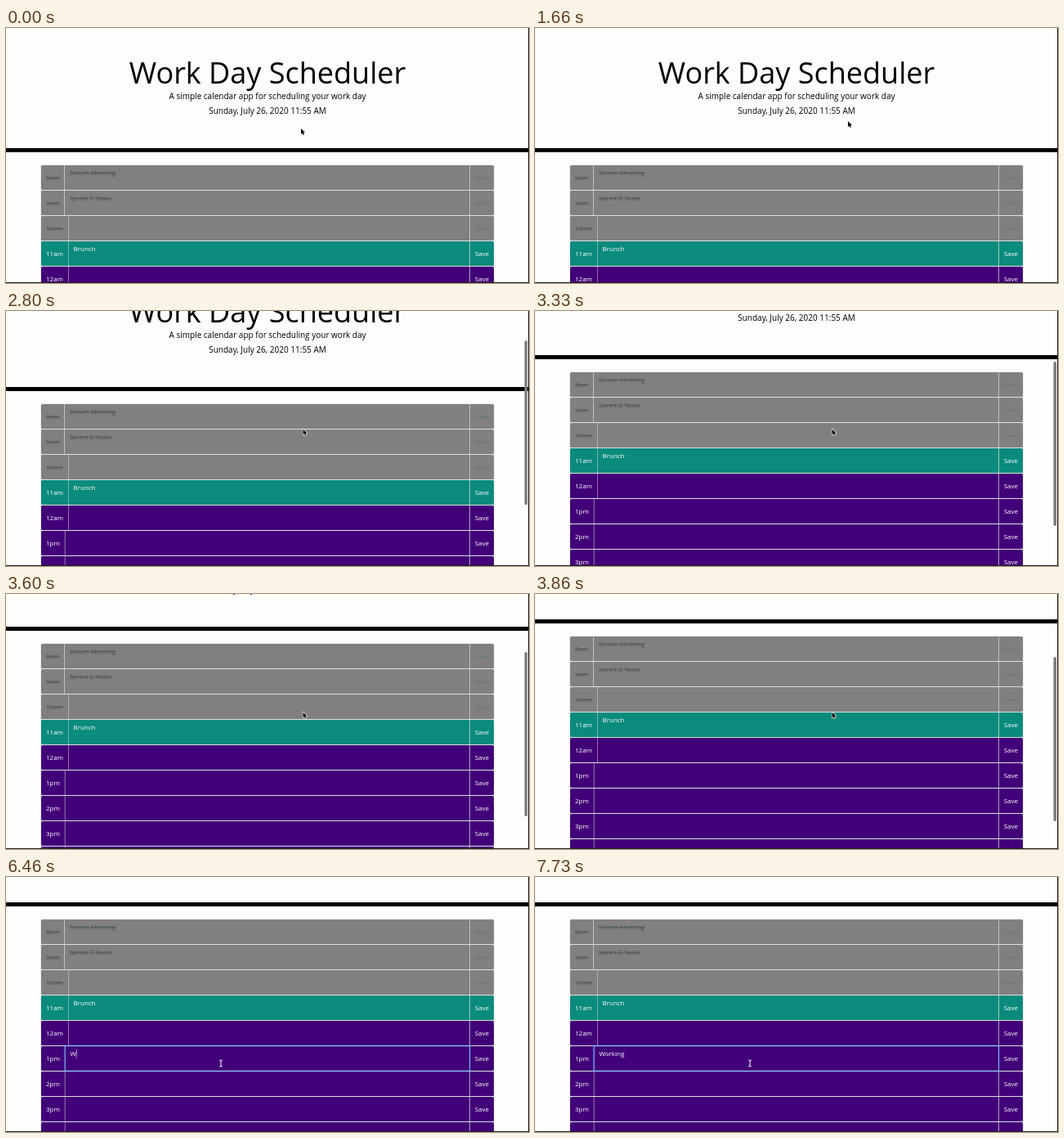
An HTML page with a canvas for the animation above (8000 ms loop, 640 px wide and 312 px high).

```html
<!DOCTYPE html>
<html lang="en">
<head>
<meta charset="utf-8">
<title>Work Day Scheduler</title>
<style>
html, body { margin: 0; width: 100%; height: 100%; overflow: hidden; background: #fdfdfc; }
canvas { display: block; width: 640px; height: 312px; }
</style>
</head>
<body>
<canvas id="stage"></canvas>
<script>
const W = 640, H = 312, LOOP = 8000;
const LEFT = 42.5, RIGHT = 597.5, TOP = 167.5, ROW = 31;
const FONT = '"Open Sans", "Noto Sans", sans-serif';
const PAST = '#808080', NOW = '#0a8b7c', NEXT = '#420078', LINE = '#d3d6da';

const canvas = document.getElementById('stage');
const ctx = canvas.getContext('2d');
const dpr = window.devicePixelRatio || 1;
canvas.width = W * dpr;
canvas.height = H * dpr;

const hours = ['8am', '9am', '10am', '11am', '12am', '1pm', '2pm', '3pm', '4pm', '5pm'];
const notes = { 0: 'Scrum Meeting', 1: 'Sprint 2 Tasks', 3: 'Brunch' };

// Each entry: time, then the values reached at that time.
const scrollPath = [[2000, 0], [2400, 22], [2800, 54], [3330, 93], [3660, 110], [3860, 116]];
const mousePath = [
  [0, 361, 123], [60, 361, 123], [260, 383, 92], [400, 387, 96], [600, 387, 96],
  [860, 381, 96], [1260, 381, 96], [1660, 383, 114], [1860, 375, 126], [2000, 363.5, 144.5],
  [4060, 363.5, 144.5], [4360, 310, 194], [4660, 302, 203], [5660, 302, 203],
  [6060, 266, 225], [6200, 263, 228]
];
const FOCUS_A = 4360, FOCUS_B = 6130, TYPE_START = 6460, KEY = 123, WORD = 'Working';

function sample(path, t) {
  if (t <= path[0][0]) return path[0].slice(1);
  for (let i = 1; i < path.length; i++) {
    const a = path[i - 1], b = path[i];
    if (t <= b[0]) {
      const k = (t - a[0]) / (b[0] - a[0]);
      return a.slice(1).map((v, j) => v + (b[j + 1] - v) * k);
    }
  }
  return path[path.length - 1].slice(1);
}

function text(str, x, y, size, color, align = 'left') {
  ctx.font = `${size}px ${FONT}`;
  ctx.textAlign = align;
  ctx.fillStyle = color;
  ctx.fillText(str, x, y);
}

function textWidth(str) {
  ctx.font = `8px ${FONT}`;
  return ctx.measureText(str).width;
}

function label(str, x, y, color, struck) {
  text(str, x, y, 8, color);
  if (struck) ctx.fillRect(x, y - 2.8, textWidth(str), 0.6);
}

function cell(x, y, w, color, radii, border = LINE) {
  ctx.fillStyle = border;
  ctx.beginPath();
  ctx.roundRect(x, y, w, ROW, radii);
  ctx.fill();
  ctx.fillStyle = color;
  ctx.beginPath();
  ctx.roundRect(x + 0.5, y + 0.5, w - 1, ROW - 1, radii.map(r => Math.max(0, r - 0.5)));
  ctx.fill();
}

function focusRing(x, y, w) {
  ctx.strokeStyle = 'rgba(0,123,255,0.25)';
  ctx.lineWidth = 1.6;
  ctx.strokeRect(x - 0.8, y - 0.8, w + 1.6, ROW + 1.6);
  ctx.strokeStyle = '#80bdff';
  ctx.lineWidth = 0.7;
  ctx.strokeRect(x + 0.3, y + 0.3, w - 0.6, ROW - 0.6);
}

function rowBox(i) {
  const saveW = textWidth('Save') + 13;
  const split = LEFT + textWidth(hours[i]) + 13;
  return { split, field: split - 0.5, fieldW: RIGHT - saveW - split + 1, save: RIGHT - saveW, saveW };
}

function drawRow(i, y, note) {
  const past = i < 3;
  const fill = past ? PAST : i === 3 ? NOW : NEXT;
  const ink = past ? '#465150' : '#fff';
  const box = rowBox(i);
  cell(LEFT, y, box.split - LEFT, fill, [2, 0, 0, 2]);
  cell(box.save, y, box.saveW, fill, [0, 2, 2, 0]);
  cell(box.field, y, box.fieldW, fill, [0, 0, 0, 0]);
  label(hours[i], LEFT + 6.5, y + 18.6, ink, past);
  label(note, box.field + 6.5, y + 12.6, ink, past);
  label('Save', box.save + 6.5, y + 18.6, past ? '#6c777b' : '#fff', past);
}

function drawFocus(i, y, note, caretOn) {
  const { field, fieldW } = rowBox(i);
  focusRing(field, y, fieldW);
  if (caretOn) {
    ctx.fillStyle = '#d8d0e2';
    ctx.fillRect(field + 6.5 + textWidth(note), y + 4.5, 0.7, 10.5);
  }
}

function drawArrow(x, y) {
  ctx.beginPath();
  [[0, 0], [0, 7], [1.6, 5.6], [2.7, 8], [3.9, 7.4], [2.9, 5.2], [5, 5]]
    .forEach(([px, py]) => ctx.lineTo(x + px, y + py));
  ctx.closePath();
  ctx.lineJoin = 'round';
  ctx.lineWidth = 1.2;
  ctx.strokeStyle = '#fff';
  ctx.stroke();
  ctx.fillStyle = '#000';
  ctx.fill();
}

function drawBeam(x, y) {
  ctx.beginPath();
  for (const s of [-1, 1]) {
    ctx.moveTo(x - 1.8, y + 4 * s);
    ctx.quadraticCurveTo(x, y + 4 * s, x, y + 2.8 * s);
    ctx.quadraticCurveTo(x, y + 4 * s, x + 1.8, y + 4 * s);
  }
  ctx.moveTo(x, y - 3.2);
  ctx.lineTo(x, y + 3.2);
  ctx.lineWidth = 1;
  ctx.strokeStyle = '#fff';
  ctx.stroke();
}

function drawScrollbar(t, scroll) {
  const alpha = Math.min(1, (t - 2000) / 100, (4600 - t) / 240);
  if (alpha <= 0) return;
  ctx.globalAlpha = alpha;
  ctx.fillStyle = '#7e7e7e';
  ctx.beginPath();
  ctx.roundRect(634.5, scroll * 0.655 + 1, 3.5, 201, 1.75);
  ctx.fill();
  ctx.globalAlpha = 1;
}

function draw(t) {
  const scroll = Math.round(sample(scrollPath, t)[0] * 2) / 2;
  const typed = t < TYPE_START ? 0 : Math.min(WORD.length, Math.floor((t - TYPE_START) / KEY) + 1);
  const word = WORD.slice(0, typed);
  const noteFor = i => i === 5 ? word : notes[i] || '';

  ctx.setTransform(dpr, 0, 0, dpr, 0, 0);
  ctx.fillStyle = '#fdfdfc';
  ctx.fillRect(0, 0, W, H);

  ctx.save();
  ctx.translate(0, -scroll);
  text('Work Day Scheduler', 320, 67.6, 36, '#000', 'center');
  text('A simple calendar app for scheduling your work day', 320, 87.3, 10, '#000', 'center');
  text('Sunday, July 26, 2020 11:55 AM', 320, 105.3, 10, '#000', 'center');
  ctx.fillStyle = '#000';
  ctx.fillRect(0, 147, W, 5);
  hours.forEach((_, i) => drawRow(i, TOP + i * ROW, noteFor(i)));

  if (t >= FOCUS_A) {
    const active = t < FOCUS_B ? 4 : 5;
    const lastKey = typed ? TYPE_START + (typed - 1) * KEY : active === 4 ? FOCUS_A : FOCUS_B;
    const caretOn = Math.floor((t - lastKey) / 515) % 2 === 0;
    drawFocus(active, TOP + active * ROW, noteFor(active), caretOn);
  }
  ctx.restore();

  drawScrollbar(t, scroll);
  ctx.fillStyle = '#222';
  ctx.fillRect(W - 1, 0, 1, H);
  ctx.fillRect(0, H - 1, W, 1);

  const [mx, my] = sample(mousePath, t);
  (t > 4100 ? drawBeam : drawArrow)(mx, my);
}

const start = performance.now();
function tick() {
  draw((performance.now() - start) % LOOP);
  requestAnimationFrame(tick);
}
tick();
</script>
</body>
</html>
```
